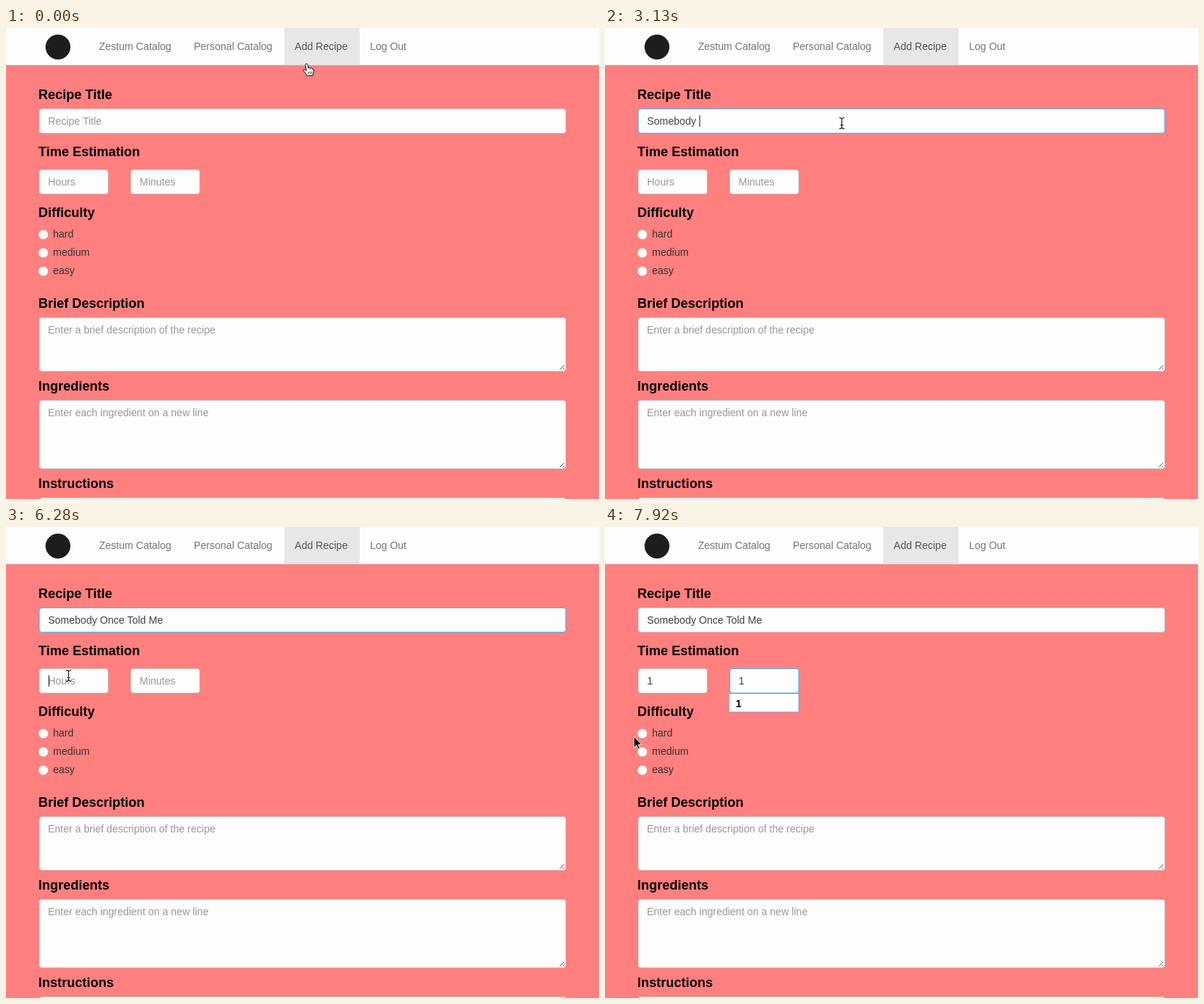
An HTML page that plays this animation: 810 px wide and 643 px high, repeating every 8 s.

```html
<!DOCTYPE html>
<html lang="en">
<head>
<meta charset="utf-8">
<title>Add Recipe</title>
<style>
  html, body { margin: 0; width: 100%; height: 100%; overflow: hidden; background: #ff807e; }
  svg { display: block; width: 810px; height: 643px; }
  text { font: 14px "Liberation Sans", Arial, sans-serif; white-space: pre; }
  .nav { fill: #777; }
  .active { fill: #555; }
  .head { font-size: 18px; font-weight: bold; fill: #000; }
  .hint { fill: #999; }
  .value { fill: #444; }
  .label { fill: #333; }
  .bold { font-weight: bold; fill: #000; }
</style>
</head>
<body>
<svg id="stage" viewBox="0 0 810 643" xmlns="http://www.w3.org/2000/svg"></svg>
<script>
const NS = "http://www.w3.org/2000/svg";
const stage = document.getElementById("stage");
const pen = document.createElement("canvas").getContext("2d");
pen.font = '14px "Liberation Sans", Arial, sans-serif';

function add(tag, attrs, parent = stage) {
  const el = document.createElementNS(NS, tag);
  for (const k in attrs) el.setAttribute(k, attrs[k]);
  parent.appendChild(el);
  return el;
}

function write(x, y, str, cls) {
  const el = add("text", { x, y, class: cls });
  el.textContent = str;
  return el;
}

function box(x, y, width, height) {
  return add("rect", { x: x + .5, y: y + .5, width: width - 1, height: height - 1,
    rx: 3.5, fill: "#fdfdfd", stroke: "#ccc" });
}

function show(el, on) {
  el.setAttribute("visibility", on ? "visible" : "hidden");
}

// A text input with hint, value, focus ring and caret
function field(x, y, width, hint) {
  const glow = add("rect", { x: x - .5, y: y - .5, width: width + 1, height: 35,
    rx: 4.5, fill: "none", stroke: "#66afe9", "stroke-opacity": .45 });
  const frame = box(x, y, width, 34);
  const left = x + 12.5;
  const hintEl = write(left, y + 22, hint, "hint");
  const valueEl = write(left, y + 22, "", "value");
  const caretEl = add("rect", { y: y + 9, width: 1, height: 16, fill: "#333" });
  return (value, focused, caret) => {
    show(glow, focused);
    frame.setAttribute("stroke", focused ? "#66afe9" : "#ccc");
    show(hintEl, !value);
    if (valueEl.textContent !== value) valueEl.textContent = value;
    caretEl.setAttribute("x", Math.round(left + pen.measureText(value).width + .8));
    show(caretEl, caret);
  };
}

function area(y, height, hint) {
  box(45, y, 720, height);
  write(57.2, y + 22, hint, "hint");
  const b = y + height;
  add("path", { d: `M756.5 ${b - 2.5}l6-6M760.5 ${b - 2.5}l2-2`, stroke: "#555", fill: "none" });
}

// Navigation bar
add("rect", { width: 810, height: 643, fill: "#ff807e" });
add("rect", { width: 810, height: 50, fill: "#fdfdfd" });
add("rect", { y: 50, width: 810, height: 1, fill: "#e3d6d6" });
add("rect", { x: 380, width: 103, height: 50, fill: "#e7e7e7" });
add("circle", { cx: 71, cy: 26, r: 17, fill: "#1d1d1d" });
write(127, 30, "Zestum Catalog", "nav");
write(256.5, 30, "Personal Catalog", "nav");
write(394.3, 30, "Add Recipe", "active");
write(497.2, 30, "Log Out", "nav");

// Form
[["Recipe Title", 97], ["Time Estimation", 175], ["Difficulty", 258],
 ["Brief Description", 382], ["Ingredients", 495], ["Instructions", 628]]
  .forEach(([str, y]) => write(44.3, y, str, "head"));

const setTitle = field(45, 110, 720, "Recipe Title");
const setHours = field(45, 193, 95, "Hours");
const setMinutes = field(170, 193, 95, "Minutes");

["hard", "medium", "easy"].forEach((str, i) => {
  const y = 282 + i * 25;
  add("circle", { cx: 51, cy: y, r: 6.6, fill: "#fdfdfd", stroke: "#d4a5a4", "stroke-width": .8 });
  write(64.3, y + 4, str, "label");
});

area(395, 74, "Enter a brief description of the recipe");
area(508, 94, "Enter each ingredient on a new line");
box(45, 641, 720, 94);

const menu = add("g", {});
add("rect", { x: 169.5, y: 227.5, width: 95, height: 25, fill: "#fff", stroke: "#8ab6ea" }, menu);
menu.appendChild(write(178.5, 246, "1", "bold"));

// Pointers, each drawn around its hot spot
const pointers = {
  hand: add("g", {}),
  arrow: add("g", {}),
  beam: add("g", {})
};
add("path", { d: "M-2 1.5C-2-.8 1-.8 1.2 1.5L2 6C3 4.7 4.6 5 4.9 6.3 6 5.4 7.3 6 7.5 7.2 8.7 6.6 9.8 7.5 9.6 9 9.6 12 8.4 13 8 16H0C-.6 13.4-3.4 11.6-4.5 9.5-5.4 7.6-3.3 6.7-1.6 8.8L-.8 9.5Z",
  fill: "#fff", stroke: "#000", "stroke-linejoin": "round" }, pointers.hand);
add("path", { d: "M2.5 10.5v3M4.7 10.5v3M6.8 10.5v3", stroke: "#000", "stroke-width": .8 }, pointers.hand);
add("path", { d: "M0 0V15.2L3.5 12 5.8 17.4 8.3 16.3 6 11.1H10.8Z",
  fill: "#000", stroke: "#fff", "stroke-linejoin": "round" }, pointers.arrow);
const beam = "M-3.5-7.5Q0-7.5 0-5.5Q0-7.5 3.5-7.5M0-5.5V5.5M-3.5 7.5Q0 7.5 0 5.5Q0 7.5 3.5 7.5M-2 2.5H2";
add("path", { d: beam, fill: "none", stroke: "#fff", "stroke-width": 2.4, "stroke-opacity": .6 }, pointers.beam);
add("path", { d: beam, fill: "none", stroke: "#111", "stroke-width": 1.1 }, pointers.beam);

// Each step overrides part of the state: m = pointer, ring = focus, caret = caret place
const LOOP = 8000;
const typed = str => ({ title: str, caret: "title" });
const steps = [
  [0, { m: ["hand", 411, 49], title: "", hours: "", minutes: "", ring: "", caret: "", menu: false }],
  [150, { m: ["arrow", 407, 64] }],
  [300, { m: ["arrow", 390, 84] }],
  [450, { m: ["beam", 362, 116] }],
  [600, { m: ["beam", 333, 128] }],
  [750, { m: ["beam", 323.5, 130], caret: "title" }],
  [900, { ring: "title" }],
  [1340, typed("S")],
  [1490, typed("So")],
  [1630, typed("Som")],
  [1780, typed("Some")],
  [2230, { caret: "" }],
  [2680, typed("Someb")],
  [2830, typed("Somebod")],
  [2980, typed("Somebody")],
  [3130, typed("Somebody ")],
  [3280, typed("Somebody O")],
  [3580, typed("Somebody On")],
  [3730, typed("Somebody Once")],
  [3880, typed("Somebody Once ")],
  [4180, typed("Somebody ")],
  [4330, typed("Somebody O")],
  [4480, typed("Somebody Onc")],
  [4630, typed("Somebody Once ")],
  [4780, typed("Somebody Once T")],
  [4930, typed("Somebody Once Tol")],
  [5080, typed("Somebody Once Told")],
  [5230, typed("Somebody Once Told ")],
  [5380, typed("Somebody Once Told M")],
  [5680, typed("Somebody Once Told Me")],
  [5830, { m: ["beam", 296, 135] }],
  [5980, { m: ["arrow", 212, 161] }],
  [6130, { m: ["beam", 112, 198] }],
  [6280, { m: ["beam", 85.5, 203], caret: "hours" }],
  [6430, { ring: "hours" }],
  [6730, { hours: "1" }],
  [6880, { m: ["arrow", 154, 207] }],
  [7020, { m: ["beam", 237.5, 210], caret: "minutes" }],
  [7170, { ring: "minutes" }],
  [7320, { minutes: "1", menu: true }],
  [7470, { m: ["beam", 222, 215] }],
  [7620, { m: ["arrow", 166, 244] }],
  [7770, { m: ["arrow", 92, 270] }],
  [7920, { m: ["arrow", 39.5, 286], caret: "" }]
];

function draw(t) {
  const s = {};
  for (const [at, change] of steps) if (at <= t) Object.assign(s, change);
  setTitle(s.title, s.ring === "title", s.caret === "title");
  setHours(s.hours, s.ring === "hours", s.caret === "hours");
  setMinutes(s.minutes, s.ring === "minutes", s.caret === "minutes");
  show(menu, s.menu);
  const [kind, x, y] = s.m;
  for (const k in pointers) show(pointers[k], k === kind);
  pointers[kind].setAttribute("transform", `translate(${x} ${y})`);
}

const start = performance.now();
function tick() {
  draw((performance.now() - start) % LOOP);
  requestAnimationFrame(tick);
}
tick();
</script>
</body>
</html>
```
